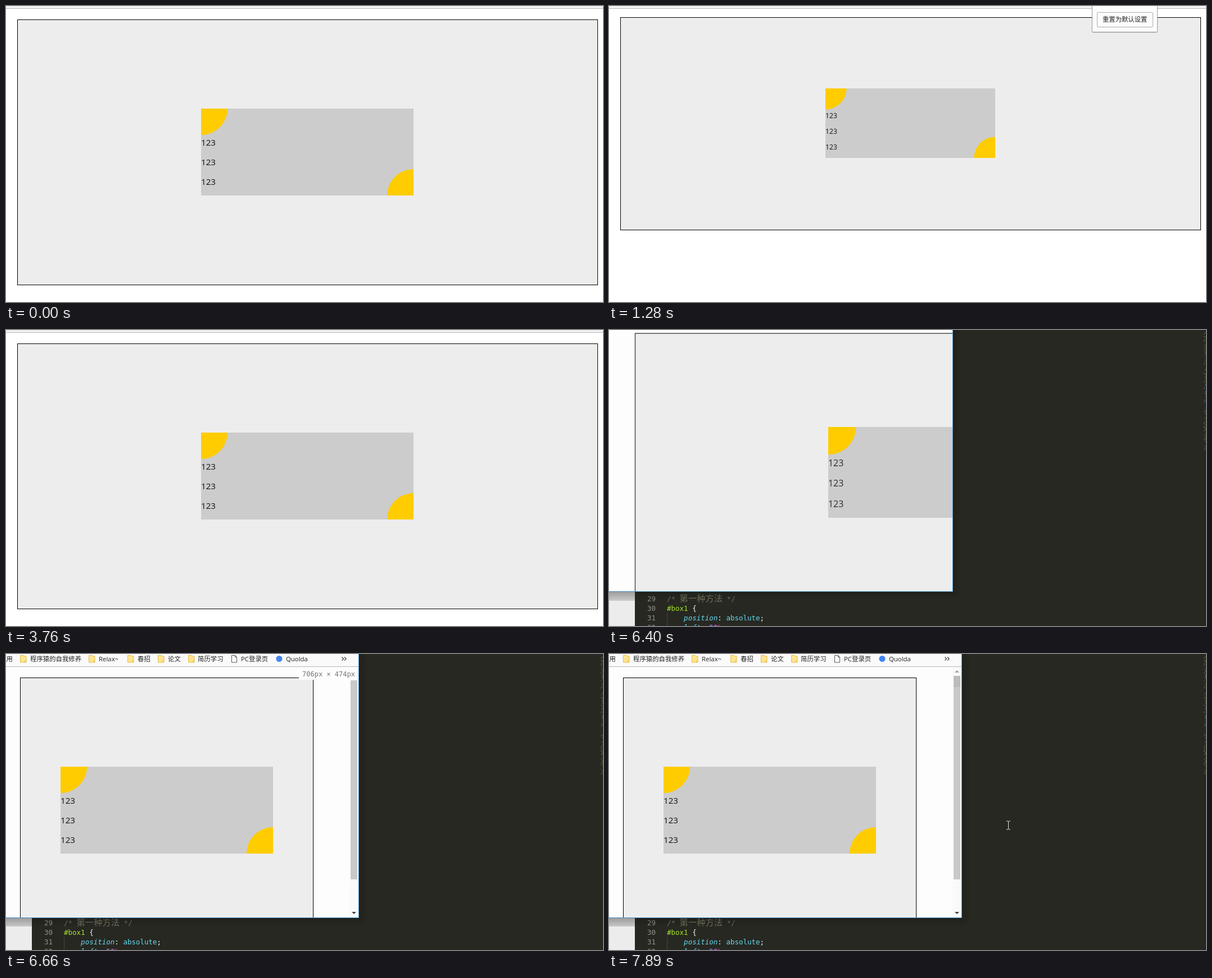
Animation of 1062x528 px, one loop 8000 ms. Source, as an HTML page:

```html
<!DOCTYPE html>
<html lang="zh">
<head>
<meta charset="utf-8">
<title>Centered box</title>
<style>
html, body { margin: 0; width: 100%; height: 100%; overflow: hidden; background: #fff; }
svg { display: block; width: 1062px; height: 528px; }
text { white-space: pre; }
.ui { font-family: "Open Sans", "Noto Sans CJK SC", "Noto Sans CJK JP", sans-serif; }
.code { font: 12.5px "DejaVu Sans Mono", "Noto Sans CJK SC", monospace; }
.cjk { font-family: "Noto Sans CJK SC", "Noto Sans CJK JP", sans-serif; font-weight: 300; font-size: 15.3px; }
.key { fill: #66d9ef; font-style: italic; }
</style>
</head>
<body>
<svg id="stage" viewBox="0 0 1062 528" xmlns="http://www.w3.org/2000/svg"></svg>
<script>
const LOOP = 8000;
const stage = document.getElementById('stage');

const rect = (x, y, w, h, fill, more = '') =>
  `<rect x="${x}" y="${y}" width="${w}" height="${h}" fill="${fill}" ${more}/>`;
const path = (d, fill, more = '') => `<path d="${d}" fill="${fill}" ${more}/>`;
const text = (x, y, size, s, fill = '#222', cls = 'ui') =>
  `<text x="${x}" y="${y}" class="${cls}" style="font-size:${size}px" fill="${fill}">${s}</text>`;

// Grey panel with two quarter discs and three lines of digits
function panel(x, y, w, h, k, ink) {
  const r = 47 * k, size = 15.2 * k;
  let s = rect(x, y, w, h, '#ccc');
  s += path(`M${x} ${y}h${r}a${r} ${r} 0 0 1 ${-r} ${r}z`, '#fc0');
  s += path(`M${x + w} ${y + h}h${-r}a${r} ${r} 0 0 1 ${r} ${-r}z`, '#fc0');
  for (let i = 0; i < 3; i++) {
    s += text(x, y + (61 + 35 * i) * k + size * 0.357, size, '123', ink);
  }
  return s;
}

function zoomBubble(alpha) {
  return `<g opacity="${alpha}">` +
    rect(858.5, -6, 118, 54, '#000', 'rx="3" opacity=".1"') +
    rect(859.5, -6, 116, 52.5, '#fcfcfc', 'rx="2" stroke="#a4a4a4"') +
    rect(861, 46, 113, 1, '#8c8c8c') +
    rect(868.5, 11.5, 99, 26, '#fdfdfd', 'rx="1" stroke="#adadad"') +
    text(878, 28.3, 11.35, '重置为默认设置', '#222') + '</g>';
}

function fullPage(k, bubble) {
  const top = Math.round(4 + 20 * k), bottom = Math.round(4.2 + 493 * k);
  const x = Math.round(536 - 188.75 * k), y = Math.round(4 + 179 * k);
  return rect(0, 0, 1062, 528, '#fff') +
    rect(0, 0, 1062, 4, '#f2f2f2') + rect(0, 4, 1062, 1, '#b6b6b6') +
    rect(20.5, top + 0.5, 1032, bottom - top, '#ededed', 'stroke="#000"') +
    panel(x, y, Math.round(377.5 * k), Math.round(155 * k), k, '#111') +
    (bubble ? zoomBubble(bubble) : '');
}

function minimap() {
  let seed = 7, s = '';
  const rnd = () => (seed = seed * 16807 % 2147483647) / 2147483647;
  const inks = ['#5f6b2c', '#55564a', '#4c6a70', '#6d6337'];
  for (let y = 1; y < 214; y += 2) {
    if (rnd() < 0.3) continue;
    const indent = rnd() < 0.6 ? 2 : 0;
    s += rect(1058 + indent, y, 1 + Math.floor(rnd() * 3), 1, inks[Math.floor(rnd() * 4)]);
  }
  return s;
}

function editor(barEnd) {
  let s = rect(0, 0, 1062, 528, '#272822') + minimap();
  s += rect(0, 460, 46, 68, '#ececec') + rect(0, 460, 46, barEnd - 460, '#c8c8c8');
  s += rect(103, 505, 1, 23, '#45463f');
  const lines = [
    '<tspan fill="#75715e">/* <tspan class="cjk">第一种方法</tspan> */</tspan>',
    '<tspan fill="#a6e22e">#box1</tspan> {',
    '    <tspan class="key">position</tspan>: <tspan fill="#66d9ef">absolute</tspan>;',
    '    <tspan class="key">left</tspan>: <tspan fill="#ae81ff">50</tspan><tspan fill="#f92672">%</tspan>;'
  ];
  lines.forEach((line, i) => {
    const y = 483.5 + 17 * i;
    s += text(68, y, 12.5, 29 + i, '#90918b', 'code') + text(103, y, 12.5, line, '#f8f8f2', 'code');
  });
  return s;
}

// Window body with soft shadow and blue edge
function frame(right, bottom, inside) {
  let s = '';
  for (let i = 7; i > 0; i--) {
    s += rect(-20, -20, right + 20 + i * 2, bottom + 20 + i * 2, '#000', `rx="${i * 2}" opacity=".03"`);
  }
  return s + rect(0, 0, right, bottom, '#fdfdfd') +
    `<clipPath id="win"><rect width="${right}" height="${bottom}"/></clipPath>` +
    `<g clip-path="url(#win)">${inside}</g>` +
    rect(right - 1, 0, 1, bottom, '#3f8fc8') + rect(0, bottom - 1, right, 1, '#3f8fc8');
}

function shrinking() {
  return editor(483) + frame(612, 467,
    rect(46.5, 6, 1088, 497, '#ededed', 'stroke="#444" stroke-width="1.4"') +
    panel(390, 173, 398, 162, 1.05, '#2c2c2c'));
}

const folder = x => path(`M${x + 0.5} 2.5h6l1.5 1.5h3v11h-10.5z`, '#ffe48f', 'stroke="#e3bd4c"') +
  rect(x + 8, 11, 3, 4, '#f3cd5d');

function bookmarks() {
  const folders = [[25, 43, '程序猿的自我修养'], [147, 165, 'Relax~'], [216, 234, '春招'],
    [270, 288, '论文'], [324, 341, '简历学习']];
  const label = (x, s) => text(x, 13.2, 11.4, s, '#222');
  return rect(0, 0, 627, 22, '#fafafa') + rect(0, 22, 627, 1, '#b6b6b6') +
    label(0.5, '用') +
    folders.map(([ix, tx, s]) => folder(ix) + label(tx, s)).join('') +
    path('M401.5 2.5h6l3 3v9.5h-9zM407.5 2.5v3h3', '#fff', 'stroke="#555"') +
    label(418, 'PC登录页') +
    '<circle cx="486" cy="8.5" r="5.5" fill="#4285f4"/>' + label(498, 'Quolda') +
    path('M597.5 5.5l3 3l-3 3M602 5.5l3 3l-3 3', 'none', 'stroke="#444" stroke-width="1.3"');
}

function scrollbar() {
  return rect(611, 23, 16, 448, '#fafafa') +
    rect(613, 39, 12, 363, '#c9c9c9') + rect(613, 39, 12, 20, '#bcbcbc') +
    path('M615 33h8l-4 -4z', '#a0a0a0') + path('M615 460h8l-4 4z', '#404040');
}

function sizeTip() {
  return rect(521, 23, 105, 23, '#fdfdfd') + text(527, 40, 12, '706px × 474px', '#777', 'code');
}

function beam([x, y]) {
  return path(`M${x - 3} ${y - 7}h2.5l1 1l1 -1h2.5M${x + 0.5} ${y - 6}v13M${x - 3} ${y + 8}h2.5l1 -1l1 1h2.5`,
    'none', 'stroke="#e4e4e4"');
}

function smallWindow({ tip, cursor } = {}) {
  return editor(486) + frame(628, 471,
    rect(25.5, 42.5, 521, 480, '#ededed', 'stroke="#000"') +
    panel(97, 201, 378, 155, 1, '#111') + scrollbar() +
    (tip ? rect(613, 39, 12, 8, '#fafafa') + rect(613, 47, 12, 12, '#c9c9c9') + sizeTip() : '') +
    bookmarks()) +
    (cursor ? beam(cursor) : '');
}

const scenes = [
  [0, () => fullPage(1)],
  [500, () => fullPage(0.9, 0.5)],
  [620, () => fullPage(0.9, 1)],
  [1280, () => fullPage(0.8, 1)],
  [2690, () => fullPage(0.9, 1)],
  [3760, () => fullPage(1)],
  [6400, shrinking],
  [6530, () => smallWindow()],
  [6660, () => smallWindow({ tip: true })],
  [7470, () => smallWindow()],
  [7600, () => smallWindow({ cursor: [1057, 362] })],
  [7750, () => smallWindow({ cursor: [800, 326] })],
  [7890, () => smallWindow({ cursor: [710, 305] })]
];

let shown = -1;
function render(t) {
  const i = scenes.findLastIndex(([start]) => start <= t);
  if (i === shown) return;
  shown = i;
  stage.innerHTML = scenes[i][1]();
}

const begin = performance.now();
function tick() {
  render((performance.now() - begin) % LOOP);
  requestAnimationFrame(tick);
}
tick();
</script>
</body>
</html>
```
